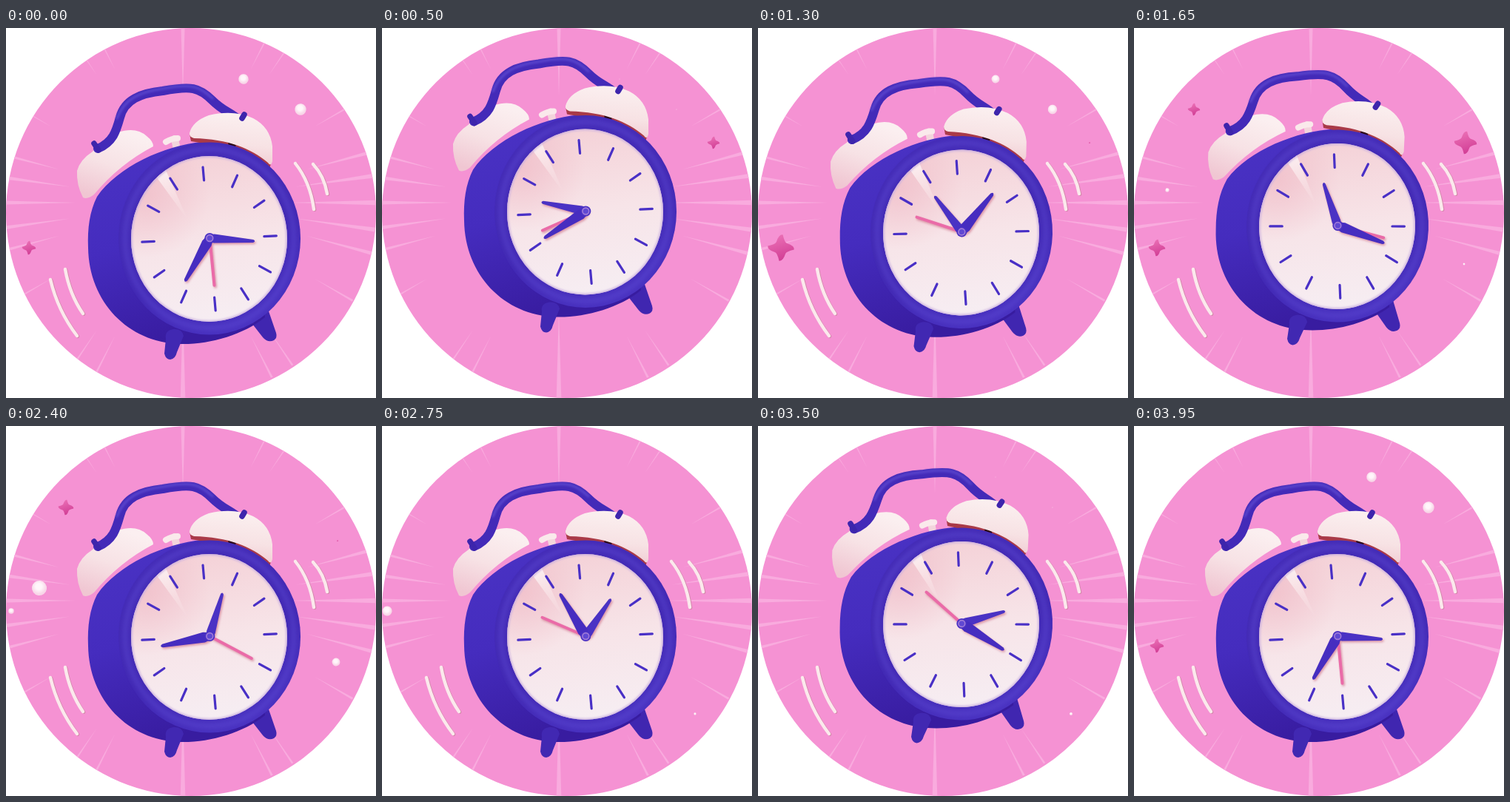
Recreate the animation shown at these times as an HTML page. Size 500 by 500 pixels, loop 4 s.

```html
<!DOCTYPE html>
<html lang="en">
<head>
<meta charset="utf-8">
<title>Alarm clock</title>
<style>
html, body { margin: 0; height: 100%; overflow: hidden; background: #fff; }
svg { display: block; width: 100vw; height: 100vh; }
.line { fill: none; stroke-linecap: round; stroke-linejoin: round; }
</style>
</head>
<body>
<svg viewBox="0 0 500 500">
  <defs>
    <linearGradient id="body" x1=".1" y1="0" x2=".4" y2="1">
      <stop offset="0" stop-color="#4a33c4"/><stop offset=".5" stop-color="#452cbe"/><stop offset="1" stop-color="#381ca0"/>
    </linearGradient>
    <linearGradient id="ring" x1=".2" y1="0" x2=".7" y2="1">
      <stop offset="0" stop-color="#452db8"/><stop offset=".6" stop-color="#4229b4"/><stop offset="1" stop-color="#4a33c2"/>
    </linearGradient>
    <linearGradient id="face" x1=".4" y1="0" x2=".55" y2="1">
      <stop offset="0" stop-color="#f4d0d6"/><stop offset=".5" stop-color="#f7e4e8"/><stop offset="1" stop-color="#f6eef3"/>
    </linearGradient>
    <linearGradient id="sheen" gradientUnits="userSpaceOnUse" x1="207" y1="200" x2="232" y2="262">
      <stop offset="0" stop-color="#fbecee"/><stop offset="1" stop-color="#fbecee" stop-opacity="0"/>
    </linearGradient>
    <radialGradient id="shade" gradientUnits="userSpaceOnUse" cx="190" cy="225" r="85">
      <stop offset="0" stop-color="#efb6c3" stop-opacity=".6"/><stop offset="1" stop-color="#efb6c3" stop-opacity="0"/>
    </radialGradient>
    <linearGradient id="bellL" x1=".65" y1=".05" x2=".3" y2="1">
      <stop offset="0" stop-color="#fbeff0"/><stop offset=".5" stop-color="#f7e2e5"/><stop offset="1" stop-color="#f0c6d2"/>
    </linearGradient>
    <linearGradient id="bellR" x1=".6" y1="0" x2=".45" y2="1">
      <stop offset="0" stop-color="#fbf0f0"/><stop offset=".6" stop-color="#f7e2e4"/><stop offset="1" stop-color="#f1ccd3"/>
    </linearGradient>
    <radialGradient id="dot" cx=".45" cy=".4">
      <stop offset=".4" stop-color="#fff6fa"/><stop offset="1" stop-color="#f8d6e8"/>
    </radialGradient>
    <linearGradient id="star" x1="0" y1="0" x2=".5" y2="1">
      <stop offset="0" stop-color="#ef78bb"/><stop offset="1" stop-color="#d23f96"/>
    </linearGradient>
    <filter id="soft" x="-30%" y="-30%" width="160%" height="160%"><feGaussianBlur stdDeviation="3"/></filter>
    <filter id="near" x="-30%" y="-30%" width="160%" height="160%"><feGaussianBlur stdDeviation="1.6"/></filter>
    <clipPath id="disc"><circle cx="250" cy="250" r="250"/></clipPath>
    <clipPath id="dial"><ellipse cx="274.5" cy="285" rx="105.5" ry="112"/></clipPath>
  </defs>

  <g clip-path="url(#disc)">
    <rect width="500" height="500" fill="#f592d3"/>
    <path id="rays" fill="#f9abde"/>
    <g id="streaks" class="line"></g>

    <g id="clock">
      <!-- right foot, button, case, left foot -->
      <path d="M333 400L347 418Q354 426 362 422Q367 419 365 412L354 380Z" fill="#4026b0"/>
      <path class="line" d="M228 150L231 164" stroke="#f3d5dc" stroke-width="10"/>
      <path class="line" d="M216 154Q224 149 232 149" stroke="#fae9eb" stroke-width="8"/>
      <path d="M265 154C215 158 150 188 123 228C113 248 110 270 111 297C112 370 165 425 235 427C275 428 320 415 350 391L330 200Z" fill="url(#body)"/>
      <path d="M214 440Q216 448 222 448Q229 447 231 438L240 416Q238 406 226 407Q214 409 216 420Z" fill="#4128b2"/>
      <!-- left bell, handle, right bell -->
      <path d="M96 193Q100 178 117 167Q130 150 151 141Q176 133 190 146Q199 153 199 160Q153 184 119 225Q110 232 104 229Q95 212 96 193Z" fill="url(#bellL)"/>
      <path class="line" d="M124 163C145 154 149 139 154 121C160 97 182 88 212 85C250 78 261 80 279 98C293 112 302 113 315 124" stroke="#432ab8" stroke-width="12"/>
      <path class="line" d="M150 122C160 95 182 86 212 82C250 75 261 78 279 95" stroke="#5b46cf" stroke-width="3" filter="url(#near)"/>
      <path d="M248 143Q300 138 359 180L356 190Q310 162 250 153Z" fill="#a93a48"/>
      <path d="M301 146L311 148L310 166L300 164Z" fill="#2d0b18"/>
      <path d="M248 142Q252 126 274 118Q308 110 334 122Q357 134 360 160L360 180Q358 188 354 182C332 163 300 150 254 149Q247 147 248 142Z" fill="url(#bellR)"/>
      <path class="line" d="M119 156L125 165M322 117L319 122" stroke="#3d25ac" stroke-width="7.5"/>
      <!-- front -->
      <ellipse cx="275" cy="284.5" rx="123" ry="130" fill="url(#ring)"/>
      <ellipse cx="275" cy="284.5" rx="114" ry="121" fill="none" stroke="#6652dc" stroke-width="5" opacity=".5" filter="url(#soft)"/>
      <g clip-path="url(#dial)">
        <rect x="160" y="165" width="230" height="240" fill="url(#face)"/>
        <rect x="160" y="165" width="230" height="240" fill="url(#shade)"/>
        <path d="M203 201L215 190L246 260Z" fill="url(#sheen)"/>
        <ellipse cx="274.5" cy="285" rx="106" ry="112.5" fill="none" stroke="#c9aede" stroke-width="4" filter="url(#near)"/>
      </g>
      <path id="ticks" class="line" stroke="#4930c6" stroke-width="3.2"/>
      <g transform="translate(275.3 284)">
        <g id="shadow" opacity=".6" transform="translate(1.5 2)" filter="url(#near)"></g>
        <path id="second" class="line" d="M0 0V-64" stroke="#ea6ba8" stroke-width="4"/>
        <path id="hour" d="M-6 -6L-2 -59Q0 -63 2 -59L6 -6Q5 3 0 4Q-5 3 -6 -6Z" fill="#4a32c4"/>
        <path id="minute" d="M-7 -8L-2.3 -65Q0 -70 2.3 -65L7 -8Q5 3 0 4Q-5 3 -7 -8Z" fill="#462dc0"/>
        <circle r="7" fill="#4a32c4"/>
        <circle r="4.4" fill="#6048d2" stroke="#a07bd8" stroke-width="1.6"/>
      </g>
    </g>
    <g id="sparks"></g>
  </g>
</svg>
<script>
const $ = id => document.getElementById(id);
const clamp = x => Math.min(1, Math.max(0, x));
const add = (parent, name, attrs) => {
  const el = document.createElementNS('http://www.w3.org/2000/svg', name);
  for (const k in attrs) el.setAttribute(k, attrs[k]);
  return parent.appendChild(el);
};

// Rays fan out around each axis and are longest on it
const ray = deg => {
  const a = deg * Math.PI / 180, axis = Math.cos(2 * a) ** 4;
  const outer = 265, inner = 210 - 65 * axis, half = (1.3 + 2 * axis) / outer;
  const at = (r, da) => `${239 + r * Math.cos(a + da)} ${236 + r * Math.sin(a + da)}`;
  return `M${at(outer, -half)}L${at(inner, 0)}L${at(outer, half)}Z`;
};
const fan = (axis, offsets) => offsets.map(o => ray(axis + o) + ray(axis - o)).join('');
$('rays').setAttribute('d', [0, 180].map(axis =>
  fan(axis, [0, 8, 15, 30]) + fan(axis + 90, [0, 27, 34])).join(''));

// Dial marks on a skewed ellipse
let marks = '';
for (let i = 0; i < 12; i++) {
  const a = i * Math.PI / 6, s = Math.sin(a), c = Math.cos(a);
  const at = r => `${274.6 + r * (82.5 * s - 7.8 * c)} ${285 - r * (3.7 * s + 88 * c)}`;
  marks += `M${at(.9)}L${at(1.1)}`;
}
$('ticks').setAttribute('d', marks);

// Hands: start angle and degrees per step
const hands = [['second', -4.5, 25.05], ['hour', 256.5, 2.5], ['minute', 136.6, 10.04]].map(([id, from, speed]) => {
  const shadow = $('shadow').appendChild($(id).cloneNode());
  shadow.removeAttribute('id');
  shadow.setAttribute(id === 'second' ? 'stroke' : 'fill', '#c8607c');
  return { from, speed, parts: [$(id), shadow] };
});

// Motion streaks open from their middle, one after another
const streaks = [
  'M391 183Q411 208 416 245', 'M415 184Q430 200 434 224',
  'M60 340Q70 382 96 416', 'M80 326Q86 360 104 386'
].map(d => [
  add($('streaks'), 'path', { d, pathLength: 1, stroke: '#d488ac', transform: 'translate(1.2 .8)' }),
  add($('streaks'), 'path', { d, pathLength: 1, stroke: '#fbe9ec' })
]);

// Sparks: x, y, radius, steps at which they are largest
const starPath = 'M0 -1Q.22 -.42 .4 -.4Q1 -.3 1 0Q.42 .22 .4 .4Q.3 1 0 1Q-.22 .42 -.4 .4Q-1 .3 -1 0Q-.42 -.22 -.4 -.4Q-.3 -1 0 -1Z';
const ball = (x, y, r, ...peaks) =>
  ({ x, y, r, peaks, el: add($('sparks'), 'circle', { r: 1, fill: 'url(#dot)' }) });
const star = (x, y, ...peaks) =>
  ({ x, y, r: 18, peaks, el: add($('sparks'), 'path', { d: starPath, fill: 'url(#star)' }) });
const sparks = [
  ball(321, 69, 7, 21, 81), ball(398, 110, 8, 21, 81), ball(45, 219, 13, 43),
  ball(7, 250, 6.5, 55), ball(446, 319, 7, 43), ball(423, 389, 3.6, 63),
  star(31, 297, 26.5, 86.5), star(448, 155, 2, 37), star(81, 110, 41)
];
const pop = x => Math.abs(x) < 11.5 ? Math.cos(x / 11.5 * Math.PI / 2) : 0;

function draw(now) {
  // 80 steps of 50 ms; the first repeats the last pose
  const n = Math.floor(now % 4000 / 50) || 79;

  // One hop, then ringing
  const hop = Math.max(0, 1 - ((n - 10) / 9.6) ** 2);
  const shake = n < 20 ? 0 : clamp(.5 - .578 * Math.cos((n - .5) * Math.PI / 3));
  $('clock').setAttribute('transform',
    `translate(0 ${-36.5 * hop - 17 * shake}) rotate(${2.6 * shake} 275 285)`);

  for (const { from, speed, parts } of hands)
    for (const el of parts) el.setAttribute('transform', `rotate(${from + speed * n})`);

  streaks.forEach((pair, i) => {
    const g = clamp((n - 15 - 2 * i) / 5);
    for (const el of pair) {
      el.setAttribute('stroke-dasharray', `0 ${(1 - g) / 2} ${g} 2`);
      el.setAttribute('stroke-width', 4.4 * g);
      el.setAttribute('visibility', g ? 'visible' : 'hidden');
    }
  });

  for (const { x, y, r, peaks, el } of sparks) {
    const size = r * Math.max(...peaks.map(p => pop(n - p)));
    el.setAttribute('transform', `translate(${x} ${y}) rotate(8) scale(${size})`);
  }
}

const t0 = performance.now();
function loop() {
  draw(performance.now() - t0);
  requestAnimationFrame(loop);
}
loop();
</script>
</body>
</html>
```
